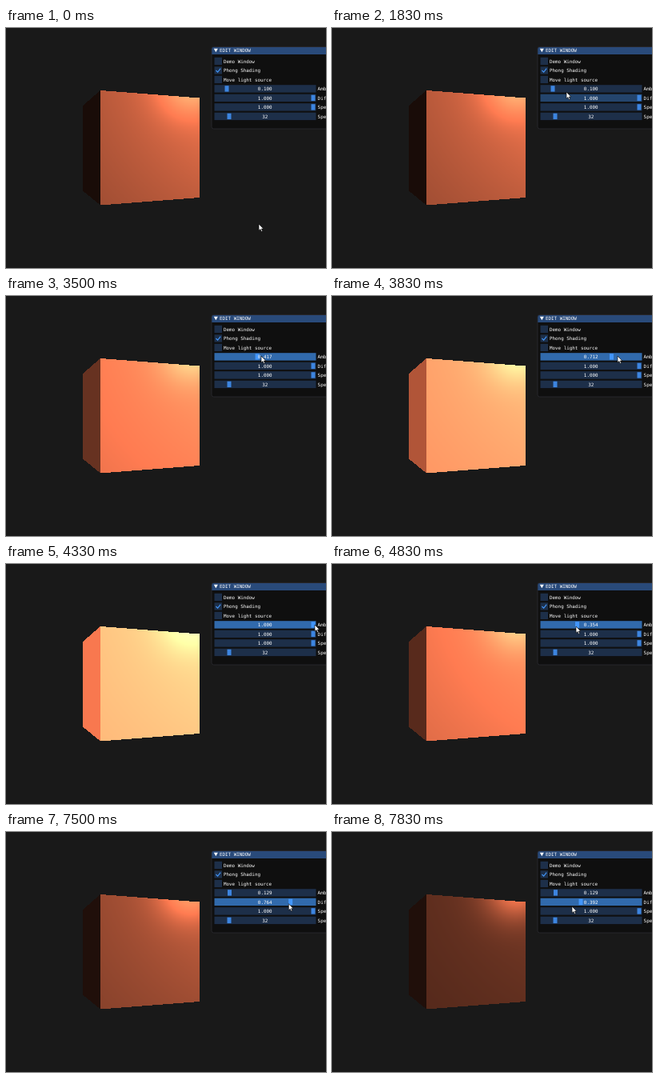
An HTML page with a canvas for the animation above (8 s loop, 400 by 300 pixels).

```html
<!DOCTYPE html>
<html lang="en">
<head>
<meta charset="utf-8">
<title>Phong cube</title>
<style>
  html, body { margin: 0; width: 100%; height: 100%; overflow: hidden; background: #191919; }
  canvas, svg { position: absolute; left: 0; top: 0; width: 400px; height: 300px; }
  text { font: 5.88px "DejaVu Sans Mono", monospace; fill: #fff; white-space: pre; }
</style>
</head>
<body>
<canvas id="view" width="400" height="300"></canvas>
<svg id="ui" viewBox="0 0 400 300">
  <rect x="257" y="23.5" width="160" height="102.5" rx="2.5" fill="#0f0f0f" stroke="#2b2b32" stroke-width=".8"/>
  <path d="M257.3 33V26Q257.3 24 259.5 24H400V33Z" fill="#294a7a"/>
  <path d="M259.8 25.8H264.8L262.3 30.3Z" fill="#fff"/>
  <text x="267" y="30.4">EDIT WINDOW</text>
</svg>
<script>
const LOOP = 8000, RATE = 6;
const BASE = [248, 120, 79];
const LIGHT = [1.2, 1, 2], EYE = [-0.96, 0, 3.04];
const SHINE = 32, GLOSS = 0.62;
const ROW_Y = [71.2, 82.7, 94.2, 105.7], ROW_H = 9.4;

// Keys are [tick, ...values], six ticks per second.
const POINTER = [
  [0, 316, 245], [3, 316, 246], [6, 317, 251], [7, 318, 251], [9, 308, 160],
  [10, 303, 96], [11, 293, 80], [13, 284, 77], [15, 277, 76], [18, 282, 75],
  [20, 300, 75], [23, 357, 75], [25, 387, 76], [26, 386, 76], [29, 305, 78],
  [32, 287, 78], [35, 282.5, 77], [40, 282.5, 77], [42, 350, 84], [43, 384, 87],
  [44, 380, 88], [47, 300, 93]
];
const AMBIENT = [[15, .1], [18, .129], [20, .27], [23, .712], [25, 1], [26, 1],
  [29, .354], [32, .17], [35, .129]];
const DIFFUSE = [[43, 1], [44, .95], [47, .392]];

const mix = (a, b, k) => a + (b - a) * k;

function sample(keys, t) {
  if (t <= keys[0][0]) return keys[0].slice(1);
  const i = keys.findIndex(k => k[0] > t);
  if (i < 0) return keys[keys.length - 1].slice(1);
  const a = keys[i - 1], b = keys[i];
  const k = (t - a[0]) / (b[0] - a[0]);
  return a.slice(1).map((v, j) => mix(v, b[j + 1], k));
}

// Cube
const ctx = document.getElementById("view").getContext("2d");
const img = ctx.createImageData(146, 146);
const LEFT = 96, TOP = 77;
const pixels = [];

const sub = (a, b) => a.map((v, i) => v - b[i]);
const dot = (a, b) => a.reduce((s, v, i) => s + v * b[i], 0);
const unit = a => a.map(v => v / Math.hypot(...a));

function shade(p) {
  const l = unit(sub(LIGHT, p)), v = unit(sub(EYE, p));
  const mirror = [-l[0], -l[1], l[2]];
  return { diff: l[2], spec: GLOSS * Math.max(0, dot(mirror, v)) ** SHINE };
}

function buildCube() {
  for (let x = 96; x < 242; x++) {
    const front = x >= 118;
    const s = front ? (x + .5 - 118) / 124 : (x + .5 - 96) / 22;
    const top = front ? mix(78, 87.5, s) : mix(97, 78, s);
    const bottom = front ? mix(221.5, 212, s) : mix(203.5, 221.5, s);
    const u = s * 124.5 / mix(143.5, 124.5, s);
    for (let y = Math.round(top); y < Math.round(bottom); y++) {
      const v = (y + .5 - top) / (bottom - top);
      const lit = front ? shade([u - .5, .5 - v, .5]) : { diff: 0, spec: 0 };
      lit.at = ((y - TOP) * img.width + x - LEFT) * 4;
      pixels.push(lit);
    }
  }
}

function drawCube(ambient, diffuse) {
  for (const p of pixels) {
    const k = ambient + diffuse * p.diff + p.spec;
    for (let c = 0; c < 3; c++) img.data[p.at + c] = BASE[c] * k;
    img.data[p.at + 3] = 255;
  }
  ctx.putImageData(img, LEFT, TOP);
}

// Panel
const ui = document.getElementById("ui");

function add(tag, attrs, label) {
  const el = document.createElementNS("http://www.w3.org/2000/svg", tag);
  for (const k in attrs) el.setAttribute(k, attrs[k]);
  if (label) el.textContent = label;
  return ui.appendChild(el);
}

["Demo Window", "Phong Shading", "Move light source"].forEach((label, i) => {
  const y = 36.8 + i * 11.5;
  add("rect", { x: 260.5, y, width: 9.5, height: 9.3, fill: "#1d2f49" });
  add("text", { x: 272, y: y + 6.9 }, label);
});
add("path", { d: "M262.5 53L264.6 55.2L268.2 50.6", fill: "none", stroke: "#4296fa", "stroke-width": 1.1 });

const sliders = ["Ambient", "Diffuse", "Specular", "Specular power"].map((label, i) => {
  const y = ROW_Y[i];
  const track = add("rect", { x: 260.5, y, width: 127, height: ROW_H });
  const grab = add("rect", { y: y + 1, width: 5, height: ROW_H - 2 });
  const value = add("text", { x: 323.7, y: y + 6.9, "text-anchor": "middle" });
  add("text", { x: 389.6, y: y + 6.9 }, label);
  return { track, grab, value };
});

const arrow = add("path", {
  d: "M0 0V8.2L1.9 6.5L3.2 9.4L4.6 8.8L3.3 6H5.8Z",
  fill: "#fff", stroke: "#000", "stroke-width": .6
});

function setSlider(i, ratio, label, state) {
  const { track, grab, value } = sliders[i];
  track.setAttribute("fill", ["#1d2f49", "#24456d", "#316aac"][state]);
  grab.setAttribute("fill", state === 2 ? "#4296fa" : "#3d85e0");
  grab.setAttribute("x", 261.5 + 120 * ratio);
  value.textContent = label;
}

function render(tick) {
  const [ambient] = sample(AMBIENT, tick), [diffuse] = sample(DIFFUSE, tick);
  const [x, y] = sample(POINTER, tick);
  const [hx, hy] = sample(POINTER, tick - .5); // hover trails the pointer
  const active = tick >= 15 && tick <= 40 ? 0 : tick >= 43 ? 1 : -1;

  drawCube(ambient, diffuse);
  [ambient, diffuse, 1, SHINE / 256].forEach((v, i) => {
    const over = hx > 260 && hx < 388 && hy >= ROW_Y[i] && hy < ROW_Y[i] + ROW_H;
    const state = active === i ? 2 : active < 0 && over ? 1 : 0;
    setSlider(i, v, i === 3 ? String(SHINE) : v.toFixed(3), state);
  });
  arrow.setAttribute("transform", `translate(${x} ${y})`);
}

buildCube();
let last = -1;
function loop() {
  const t = performance.now() % LOOP;
  const tick = Math.floor((t + 5) * RATE / 1000) % (LOOP * RATE / 1000);
  if (tick !== last) render(last = tick);
  requestAnimationFrame(loop);
}
loop();
</script>
</body>
</html>
```
